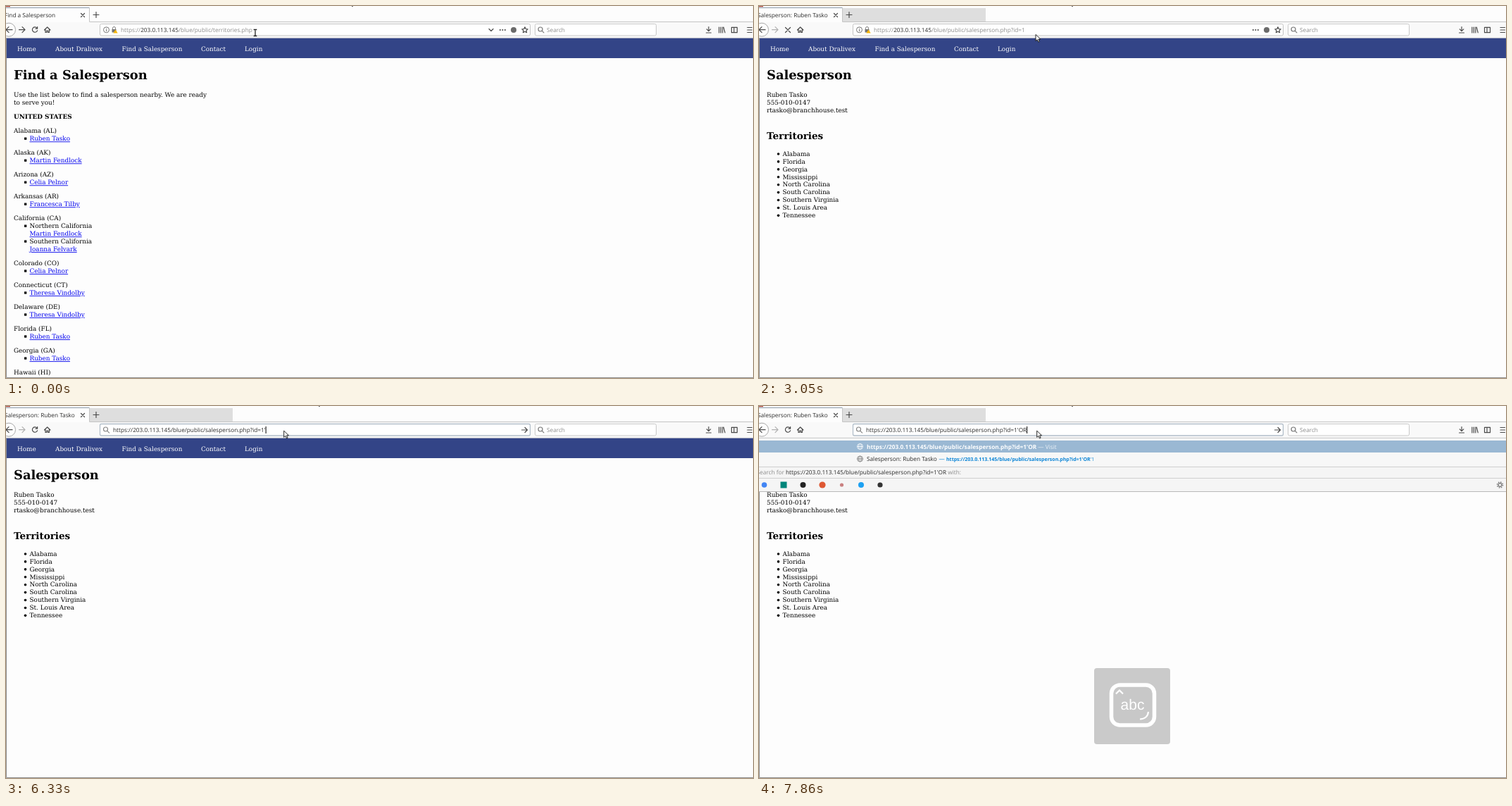
An HTML page that plays this animation: 1061x528 px, repeating every 8 s.

```html
<!DOCTYPE html>
<html lang="en">
<head>
<meta charset="utf-8">
<title>Find a Salesperson</title>
<style>
html, body { margin: 0; width: 100%; height: 100%; overflow: hidden; background: #fdfdfd; }
svg { display: block; width: 1061px; height: 528px; }
text { white-space: pre; text-rendering: geometricPrecision; }
.ui text { font: 8.25px "Open Sans", "Noto Sans", sans-serif; fill: #2b2b2b; }
.page text { font: 8.85px "DejaVu Serif", serif; fill: #000; }
.page .h1 { font-size: 17.85px; font-weight: bold; }
.page .h2 { font-size: 13.5px; font-weight: bold; }
.page .b { font-weight: bold; }
.page .link { fill: #00e; text-decoration: underline; }
.page .nav { fill: #fff; }
.ui .grey { fill: #8c8c8c; }
.ui .white { fill: #fff; }
.ui .bold { font-weight: bold; }
.ui .blue { fill: #0a84d6; }
.ui .small { font-size: 7px; }
.ui .keys { font: 21px "Liberation Sans", sans-serif; fill: #fff; text-anchor: middle; }
.ic { fill: none; stroke: #4a4a4a; stroke-width: 1.2; stroke-linecap: round; stroke-linejoin: round; }
.rule { stroke: #cfcfcf; }
</style>
</head>
<body>
<svg viewBox="0 0 1061 528">
  <defs><clipPath id="tabClip"><rect width="101" height="22"/></clipPath></defs>
  <rect width="1061" height="528" fill="#fdfdfd"/>

  <g class="page">
    <rect y="45.5" width="1061" height="28.5" fill="#334487"/>
    <g id="nav"></g>
    <g id="list"></g>
    <g id="person"></g>
    <rect id="linkBox" x="33.5" y="182.5" width="59" height="11" fill="none" stroke="#5a5aff" stroke-dasharray="1 1"/>
    <path d="M.5 45V527.5H1061" fill="none" stroke="#8e8e8e"/>
  </g>

  <g class="ui">
    <!-- tab strip -->
    <rect width="6" height="1.2" fill="#a33a30"/>
    <rect id="speck" width="2" height="1" fill="#666"/>
    <rect id="strip" x="119" y="3" width="203" height="19.5" fill="#dedede"/>
    <path d="M0 2.5H118.5" stroke="#8b9aa8"/>
    <path d="M118.5 3V22.5H1061" fill="none" stroke="#c4c4c4"/>
    <g clip-path="url(#tabClip)"><text id="tab" y="16"></text></g>
    <circle id="tabDot" cx="5" cy="13" r="1.4" fill="#777"/>
    <path class="ic" d="M106.5 10.5l5 5m0-5l-5 5M124 12.5h8m-4-4v8"/>

    <!-- toolbar -->
    <rect y="23" width="1061" height="22" fill="#f9f9f9"/>
    <path d="M0 45.3H1061" stroke="#c4c4c4" stroke-width=".6"/>
    <circle cx="4" cy="33.7" r="9.5" fill="#fdfdfd" stroke="#a9a9a9"/>
    <path class="ic" d="M9 33.7H0m4-4l-4 4 4 4"/>
    <path class="ic" id="fwd" d="M18.5 33.7h8.5m-4-4l4 4-4 4"/>
    <path class="ic" id="reload" d="M44 31.2a3.7 3.7 0 1 0 .6 3.6M44.6 29.6v2.6h-2.6"/>
    <path class="ic" id="stop" d="M37.5 30.5l7 7m0-7l-7 7"/>
    <path class="ic" d="M54.5 34l4.2-4 4.2 4M56 33.5v4h1.8v-2.5h1.8v2.5h1.8v-4"/>
    <rect id="bar" x="133.5" y="25.5" width="611" height="16.5" rx="2" fill="#fff"/>
    <g id="idIcons">
      <circle cx="142.5" cy="33.8" r="4" fill="none" stroke="#777"/>
      <path d="M142.5 33v3M142.5 31.4v.9" stroke="#777"/>
      <path d="M151.5 33v-1.5a2 2 0 0 1 4 0V33" fill="none" stroke="#777"/>
      <rect x="150.5" y="33" width="6" height="4.5" fill="#777"/>
      <path d="M155.5 33.5l3.2 5h-6.4z" fill="#f5b400"/>
      <path class="ic" id="chev" d="M686 32.5l3 3 3-3"/>
      <path d="M701.8 34h.1m3.4 0h.1m3.4 0h.1" stroke="#4a4a4a" stroke-width="2" stroke-linecap="round"/>
      <circle cx="721" cy="34" r="4" fill="#6a6a6a"/>
      <path class="ic" d="M737 29.8l1.2 2.7 3 .3-2.2 2 .6 2.9-2.6-1.5-2.6 1.5.6-2.9-2.2-2 3-.3z"/>
    </g>
    <g class="ic" id="findIcons">
      <g stroke="#888"><circle cx="141.5" cy="33" r="3"/><path d="M143.8 35.3l2.8 2.8"/></g>
      <path d="M732.5 34h8m-3.5-3.5l3.5 3.5-3.5 3.5"/>
    </g>
    <rect id="sel" y="29" height="11" fill="#86afd6"/>
    <text id="url" y="37"><tspan id="scheme">https://</tspan><tspan id="host">203.0.113.145</tspan><tspan id="path"></tspan></text>
    <rect id="caret" y="29" width="1" height="10" fill="#000"/>
    <rect x="751.5" y="25.5" width="172" height="16.5" rx="2" fill="#fff" stroke="#c9c9c9"/>
    <g class="ic" style="stroke:#777"><circle cx="759" cy="33" r="3"/><path d="M761.3 35.3l2.6 2.6"/></g>
    <text class="grey" x="768" y="37">Search</text>
    <path class="ic" d="M998 29.5v6m-2.8-2.6l2.8 2.8 2.8-2.8M994.5 38h7M1012.8 30v8M1015.3 30v8M1017.8 30v8M1019.2 30.2l2 7.6M1030.5 30.3h8v7.4h-8zM1034 30.3v7.4M1053 30.5h6.5M1053 34h6.5M1053 37.5h6.5"/>

    <!-- suggestions -->
    <g id="drop">
      <rect y="46" width="1061" height="40.5" fill="#f7f7f7"/>
      <path class="rule" d="M0 45.5H1061"/>
      <rect y="49" width="1061" height="17" fill="#9ab8d3"/>
      <g id="globes" fill="none" stroke-width=".8"></g>
      <text class="white bold" x="153" y="60.5"><tspan class="q"></tspan><tspan font-weight="400" opacity=".8"> — Visit</tspan></text>
      <text x="153" y="78">Salesperson: Ruben Tasko</text>
      <text class="blue" x="255.5" y="78">—</text>
      <text class="blue bold small" x="266" y="77.6"><tspan class="q"></tspan><tspan id="rest" font-weight="400"></tspan></text>
      <g id="engines">
        <rect y="84.5" width="1061" height="37.5" fill="#f5f5f5"/>
        <path class="rule" d="M0 86.5H1061M0 102.5H1061"/>
        <path d="M0 121.5H1061" stroke="#b9b9b9"/>
        <text class="grey" x="35.8" y="97.3" text-anchor="end">Search for</text>
        <text x="38" y="97.3"><tspan class="q"></tspan><tspan class="grey"> with:</tspan></text>
        <circle cx="7.5" cy="112" r="3.8" fill="#4285f4"/>
        <rect x="30.5" y="107.5" width="9" height="9" fill="#00857a"/>
        <circle cx="62.5" cy="112" r="4" fill="#222"/>
        <circle cx="90" cy="112" r="4.6" fill="#de5833"/>
        <circle cx="117.5" cy="112" r="2.6" fill="#c98080"/>
        <circle cx="145" cy="112" r="4" fill="#1da1f2"/>
        <circle cx="172" cy="112" r="3.6" fill="#333"/>
        <circle cx="1052.5" cy="112" r="2.4" fill="none" stroke="#777" stroke-width="1.2"/>
        <circle cx="1052.5" cy="112" r="4" fill="none" stroke="#777" stroke-width="1.4" stroke-dasharray="1.6 1.54"/>
      </g>
    </g>

    <!-- status line -->
    <g id="status">
      <rect id="statusBox" x="-1" y="522.5" height="8" fill="#f4f4f4" stroke="#b5b5b5"/>
      <text id="statusText" y="531.5"></text>
    </g>

    <!-- caps lock notice -->
    <g id="caps">
      <rect x="476" y="372" width="108" height="108" rx="4" fill="#cacaca"/>
      <rect x="500.5" y="396" width="61" height="57" rx="12" fill="#c8c8c8" stroke="#fff" stroke-width="5.5"/>
      <path d="M507 408.5l5-5 5 5M553 434q-1 10-12 10.500" fill="none" stroke="#fff" stroke-width="2.2"/>
      <text class="keys" id="keys" x="530.5" y="431"></text>
    </g>
  </g>

  <g id="pointer">
    <path id="beam" d="M-2.300-4.500H-.6L0-4 .6-4.500H2.300M0-4V4M-2.300 4.500H-.6L0 4 .6 4.500H2.300" fill="none" stroke="#222" stroke-width="1.3"/>
    <path id="arrow" d="M0 0V9.200L2.200 7.200 3.800 10.700 5.400 10 3.900 6.600H6.900Z" fill="#fff" stroke="#111" stroke-width=".9"/>
    <path id="hand" d="M-4.500-4.200Q-3.400-5-2.500-3.800L-1.200-2 1-2.200 3-1.600 4.600-.8 5 2 3.800 4.600H-1L-4.600 1.200Q-4.200 0-2.400.8L-4.800-3Z" fill="#fff" stroke="#111" stroke-width=".9"/>
  </g>
</svg>

<script>
const $ = id => document.getElementById(id);
const LOOP = 8000;
const text = (x, y, str, cls = '') => `<text x="${x}" y="${y}" class="${cls}">${str}</text>`;

// page content
$('nav').innerHTML = [[16, 'Home'], [70, 'About Dralivex'], [164.5, 'Find a Salesperson'], [277, 'Contact'], [339, 'Login']]
  .map(([x, s]) => text(x, 64, s, 'nav')).join('');

const RUBEN = 'Ruben Tasko', MARTIN = 'Martin Fendlock', CELIA = 'Celia Pelnor', THERESA = 'Theresa Vindolby';
const states = [
  ['Alabama (AL)', RUBEN], ['Alaska (AK)', MARTIN], ['Arizona (AZ)', CELIA], ['Arkansas (AR)', 'Francesca Tilby'],
  ['California (CA)', ['Northern California', MARTIN], ['Southern California', 'Joanna Felvark']],
  ['Colorado (CO)', CELIA], ['Connecticut (CT)', THERESA], ['Delaware (DE)', THERESA],
  ['Florida (FL)', RUBEN], ['Georgia (GA)', RUBEN], ['Hawaii (HI)', MARTIN]
];
const square = y => `<rect x="26" y="${y - 4.8}" width="3.300" height="3.300"/>`;

function buildList() {
  let out = text(11, 103.5, 'Find a Salesperson', 'h1') +
    text(11, 129.4, 'Use the list below to find a salesperson nearby. We are ready') +
    text(11, 140.3, 'to serve you!') + text(11, 160.3, 'UNITED STATES', 'b');
  let y = 180.4;
  for (const [name, ...areas] of states) {
    out += text(11, y, name);
    for (const area of areas) {
      y += 10.95;
      out += square(y);
      if (Array.isArray(area)) {
        out += text(33.5, y, area[0]);
        y += 10.95;
      }
      out += text(33.5, y, Array.isArray(area) ? area[1] : area, 'link');
    }
    y += 20.05;
  }
  return out;
}
$('list').innerHTML = buildList();

$('person').innerHTML = text(11, 103.5, 'Salesperson', 'h1') + text(11, 129.4, RUBEN) +
  text(11, 140.3, '555-010-0147') + text(11, 151.2, 'rtasko@branchhouse.test') +
  text(11, 189, 'Territories', 'h2') +
  ['Alabama', 'Florida', 'Georgia', 'Mississippi', 'North Carolina', 'South Carolina', 'Southern Virginia', 'St. Louis Area', 'Tennessee']
    .map((s, i) => {
      const y = 212.8 + i * 10.92;
      return `<circle cx="27.500" cy="${y - 2.8}" r="1.800"/>` + text(33.5, y, s);
    }).join('');

$('globes').innerHTML = [[57.5, '#fff'], [75, '#777']].map(([y, c]) =>
  `<g stroke="${c}"><circle cx="143.500" cy="${y}" r="4"/><ellipse cx="143.500" cy="${y}" rx="1.800" ry="4"/><path d="M139.500 ${y}h8"/></g>`).join('');

// timeline: each step changes part of the state
const HOST = 'https://203.0.113.145';
const LIST = '/blue/public/territories.php', PERSON = '/blue/public/salesperson.php?id=1';
const HINT = [212, -3, HOST + PERSON], WAIT = [173, -8, 'Waiting for 203.0.113.145…'];
const at = (type, x, y) => ({ cur: [type, x, y] });

const steps = [
  [0, { ...at('beam', 354, 38), path: LIST, focus: 0, chev: 1, person: 0, tab: 'Find a Salesperson', busy: 0, stop: 0,
        fwd: 1, speck: 491, strip: 0, link: 0, sel: 0, caret: 0, status: null, find: 0, drop: 0, query: '', shift: 0, caps: '' }],
  [250, at('beam', 360, 33)],
  [400, at('beam', 356, 33)],
  [550, { ...at('arrow', 255, 78), chev: .6 }],
  [670, { ...at('arrow', 118.5, 132.5), chev: .3 }],
  [820, { ...at('arrow', 84, 168), chev: .12 }],
  [950, { ...at('hand', 67, 188), chev: 0 }],
  [1090, { ...at('hand', 67, 188), status: HINT }],
  [1220, at('hand', 68, 188)],
  [1360, at('hand', 74, 189)],
  [1490, at('arrow', 72, 196.5)],
  [1620, at('arrow', 71, 195)],
  [1760, { ...at('arrow', 73, 194), status: null }],
  [1890, { ...at('hand', 76, 193), status: HINT }],
  [2010, at('hand', 77, 193)],
  [2160, { ...at('hand', 77, 189), link: 1 }],
  [2410, { tab: 'Connecting…', busy: 1 }],
  [2530, { stop: 1 }],
  [2680, { ...at('beam', 77, 189), tab: 'Salesperson: Ruben Tasko', path: PERSON, fwd: 0, speck: 444, status: WAIT }],
  [2800, { person: 1, link: 0 }],
  [2930, { ...at('arrow', 215, 110), busy: 0, strip: 1, status: null }],
  [3050, at('arrow', 393, 40.5)],
  [3190, { ...at('beam', 398, 38), stop: 0, chev: 1 }],
  [3340, at('beam', 390, 35)],
  [3460, at('beam', 374, 31)],
  [3610, at('beam', 376, 34)],
  [3740, at('beam', 380, 37)],
  [3890, { focus: 1, caret: 1 }],
  [4010, { sel: 1, caret: 0 }],
  [4280, at('beam', 390, 35)],
  [4410, at('beam', 415, 37)],
  [4530, { ...at('beam', 382, 35), sel: 0, caret: 1 }],
  [4960, at('beam', 385, 35)],
  [5100, { ...at('beam', 388, 37), caret: 0 }],
  [5250, at('beam', 395, 37)],
  [6180, { caret: 1 }],
  [6330, { ...at('arrow', 394.7, 35.2), path: PERSON + "'", find: 1 }],
  [6460, { drop: 1, query: "'", shift: -4 }],
  [6610, { shift: 0 }],
  [7330, { caps: 'ABC' }],
  [7450, { path: PERSON + "'O" }],
  [7590, { query: "'O" }],
  [7710, { path: PERSON + "'OR", query: "'OR" }],
  [7860, { caps: 'abc' }]
];
let full = {};
const frames = steps.map(([time, change]) => [time, full = { ...full, ...change }]);

const show = (id, on) => { $(id).style.display = on ? '' : 'none'; };
const set = (id, attrs) => { for (const k in attrs) $(id).setAttribute(k, attrs[k]); };

function draw(s) {
  const [type, x, y] = s.cur;
  for (const id of ['beam', 'arrow', 'hand']) show(id, id === type);
  set('pointer', { transform: `translate(${x} ${y})` });

  show('list', !s.person);
  show('person', s.person);
  show('linkBox', s.link);
  show('strip', s.strip);
  set('speck', { x: s.speck });

  $('tab').textContent = s.tab;
  set('tab', { x: s.busy ? 11 : -2 });
  show('tabDot', s.busy);
  show('stop', s.stop);
  show('reload', !s.stop);
  $('fwd').style.stroke = s.fwd ? '' : '#b0b0b0';

  set('bar', { stroke: s.focus ? '#b3bfca' : '#c4c4c4', 'stroke-width': s.focus ? 1.3 : 1 });
  show('idIcons', !s.find);
  show('findIcons', s.find);
  set('chev', { opacity: s.chev });

  const left = s.find ? 152 : 163, url = $('url');
  $('path').textContent = s.path;
  set('url', { x: left });
  for (const id of ['scheme', 'path']) $(id).style.fill = s.focus ? '' : '#8c8c8c';
  const end = left + url.getComputedTextLength();
  show('caret', s.caret);
  set('caret', { x: end });
  show('sel', s.sel);
  set('sel', { x: end - 5, width: 5.5 });

  show('drop', s.drop);
  for (const q of document.querySelectorAll('.q')) q.textContent = HOST + PERSON + s.query;
  $('rest').textContent = "'OR'1".slice(s.query.length);
  set('engines', { transform: `translate(0 ${s.shift})` });

  show('status', s.status);
  if (s.status) {
    const [width, tx, label] = s.status;
    set('statusBox', { width: width + 1 });
    set('statusText', { x: tx });
    $('statusText').textContent = label;
  }

  show('caps', s.caps);
  $('keys').textContent = s.caps;
}

const start = performance.now();
let last = null;
function tick() {
  const t = (performance.now() - start) % LOOP;
  const state = frames.filter(f => f[0] <= t).pop()[1];
  if (state !== last) draw(last = state);
  requestAnimationFrame(tick);
}
tick();
</script>
</body>
</html>
```
